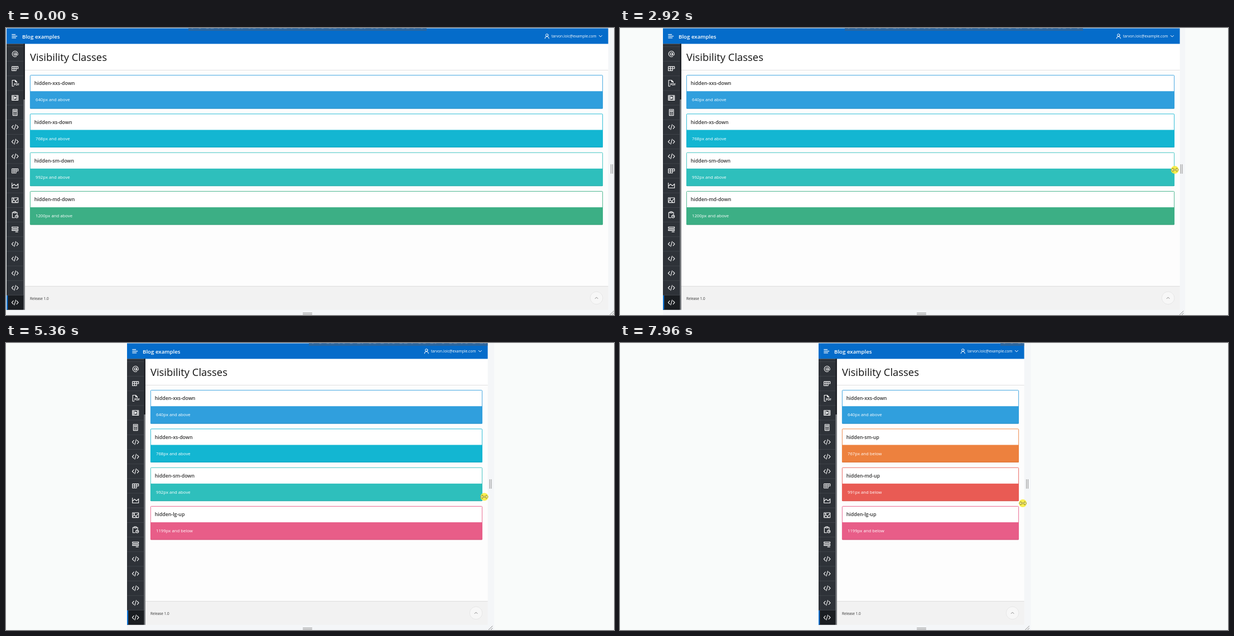
An HTML page for the animation above (8 s loop, 1090 px wide and 514 px high).

```html
<!DOCTYPE html>
<html lang="en">
<head>
<meta charset="utf-8">
<title>Visibility Classes</title>
<style>
html, body { margin: 0; width: 100%; height: 100%; overflow: hidden; background: #f9fbfa; }
svg { display: block; width: 1090px; height: 514px; font-family: "Open Sans", "Noto Sans", sans-serif; }
.line { fill: none; stroke-linecap: round; stroke-linejoin: round; }
</style>
</head>
<body>
<svg id="stage" viewBox="0 0 1090 514"></svg>
<script>
const stage = document.getElementById('stage');
const LOOP = 8000, SCALE = 0.5454, PITCH = 26.18;

// time, page left, handle offset, cursor offset (both from page right), cursor y
const KEYS = [
  [0, 1, 6.5, 4, 240],
  [1040, 2, 6.5, 4, 243],
  [1280, 6, 6.5, 0, 244],
  [2240, 49, 5, -6, 250],
  [2920, 77, 3, -9, 254],
  [3520, 120, 2, -7, 259],
  [4120, 149, 3.5, -5, 263],
  [4720, 195, 5, -5, 270],
  [5360, 217, 5, -6, 275.5],
  [5960, 251, 4, -5, 277.5],
  [7160, 306, 2, -4.5, 280.5],
  [7960, 356, 5.5, -2.5, 287]
];

// The screen refreshes every 200 ms, apart from a few uneven steps
const GAPS = { 4: 160, 5: 160, 6: 240, 11: 160, 12: 240, 13: 240, 18: 240, 19: 160, 25: 240 };
const ticks = [0, 120];
for (let k = 1; k < 40; k++) ticks.push(ticks[k] + (GAPS[k] || 200));

// Each card: its wide look, then its look below the breakpoint
const CARDS = [
  { min: 0, wide: ['hidden-xxs-down', '640px and above', '#309fdd'] },
  { min: 768, wide: ['hidden-xs-down', '768px and above', '#13b6d2'], slim: ['hidden-sm-up', '767px and below', '#ed813e'] },
  { min: 992, wide: ['hidden-sm-down', '992px and above', '#2ebfbc'], slim: ['hidden-md-up', '991px and below', '#e95b54'] },
  { min: 1200, wide: ['hidden-md-down', '1200px and above', '#3caf85'], slim: ['hidden-lg-up', '1199px and below', '#e85d88'] }
];

const ICONS = {
  at: '<circle r="2"/><path d="M2-2V.8a1.5 1.5 0 0 0 3 0V0A5 5 0 1 0 2.5 4.3"/>',
  grid: '<path d="M-5.5-3.6H5.5V.1H1.8V3.8H-5.5ZM-5.5 .1H1.8V-3.6M-1.8-3.6V3.8"/>',
  pdf: '<path d="M-2.3 5.4H-5V-5.4H.3L3.2-2.5V-.8M.3-5.4V-2.5H3.2"/><text x="-2.2" y="4.6" font-size="5.2" font-weight="700" fill="#fff" stroke="none">PDF</text>',
  film: '<path d="M-5.5-4.3H5.5V4.3H-5.5ZM-3.2-4.3V4.3M3.2-4.3V4.3M-5.5-1.4H-3.2M-5.5 1.4H-3.2M5.5-1.4H3.2M5.5 1.4H3.2"/><path d="M-1.2-2L1.8 0-1.2 2Z" fill="#fff"/>',
  calc: '<path d="M-3.8-5.4H3.8V5.4H-3.8ZM-2-3.4H2V-1.6H-2Z"/><path d="M-1.9 .9H2M-1.9 3.2H2" stroke-dasharray=".5 1.4"/>',
  code: '<path d="M-3-3L-5.8 0-3 3M3-3L5.8 0 3 3M1.3-4.5L-1.3 4.5"/>',
  chart: '<path d="M-5.5-4.5V4.4H5.5V-3L2 .6-1.8-2.4-5.5 1.6"/>',
  image: '<path d="M-5.5-4.3H5.5V4.3H-5.5ZM-5.3 2.8L-2.2-.4 .4 2 5.3-2.6M.4 2L2.5 4"/><circle cx="-2.6" cy="-2.3" r=".7"/>',
  clip: '<path d="M-.6 5.2H-4.8V-4.3H-2.4M1.4-4.3H3.8V-.6M-2.4-5.4H1.4V-3.2H-2.4Z"/><circle cx="3" cy="3" r="2.5"/><path d="M3 1.7V3H4"/>',
  rows: '<path d="M-5.4-4.4H5.4V-2H-5.4ZM-5.4 .1H5.4V2H-5.4ZM1 4.5H5" />'
};
const MENU = 'at grid pdf film calc code code code grid chart image clip rows code code code code code'.split(' ');

const rect = (x, y, w, h, fill, more = '') =>
  `<rect x="${x}" y="${y}" width="${w}" height="${h}" fill="${fill}" ${more}/>`;
const text = (x, y, size, fill, str, more = '') =>
  `<text x="${x}" y="${y}" font-size="${size}" fill="${fill}" ${more}>${str}</text>`;
const line = (d, stroke, w = 1, more = '') =>
  `<path class="line" d="${d}" stroke="${stroke}" stroke-width="${w}" ${more}/>`;

function sidebar() {
  let s = rect(0, 28.3, 33, 476.2, '#2e3238') + rect(30.2, 28.3, 2.8, 100, '#23262b');
  s += rect(30.5, 128, 2.3, 376.5, '#85888b');
  MENU.forEach((name, i) => {
    const y = 46.5 + i * PITCH;
    const top = y - PITCH / 2;
    if (i === MENU.length - 1) {
      s += rect(0, top, 30.3, PITCH, '#1a1d21') + rect(0, top, 2.2, PITCH, '#0a6fd0');
    }
    s += rect(0, top - 0.4, 30.3, 0.8, '#43474d');
    s += `<g class="line" stroke="#fff" stroke-width="1.1" transform="translate(15.2 ${y})">${ICONS[name]}</g>`;
  });
  return s;
}

function card(i) {
  const y = 84.2 + i * 69.3;
  return `<g id="card${i}">` +
    rect(42.4, y + 0.4, 0, 59.6, '#fff', 'class="box" rx="1.2"') +
    rect(42, y + 29, 0, 31.2, '#000', 'class="fill"') +
    rect(42.4, y + 59.4, 0, 0.8, '#000', 'class="foot" opacity=".12"') +
    text(49.7, y + 18, 8.8, '#333', '', 'class="name" font-weight="600"') +
    text(52, y + 47.1, 7.75, '#fff', '', 'class="range" font-weight="500"') + '</g>';
}

// Faint marks along the blurred bar over the header
let marks = '';
for (let i = 0; i < 38; i++) marks += `M${332 + i * 11 + (i * 7) % 5} .8h${2 + (i * 5) % 4}`;

stage.innerHTML =
  rect(0, 0, 1090, 514, '#f9fbfa') +
  rect(0, 0, 0, 514, '#f4f6f8', 'id="frame"') +
  `<g id="page">` +
    rect(0, 28, 0, 47.5, '#fff', 'class="full"') +
    rect(0, 75.5, 0, 387, '#fdfdfd', 'class="full"') +
    rect(0, 75, 0, 0.9, '#dedede', 'class="full"') +
    rect(0, 462, 0, 42.5, '#f2f2f2', 'class="full"') +
    rect(0, 462, 0, 0.9, '#dcdcdc', 'class="full"') +
    rect(0, 0.6, 0, 27.8, '#056cca', 'class="full"') +
    `<svg id="bar" x="326" y="0" width="427" height="6" viewBox="326 0 427 6" preserveAspectRatio="xMinYMin slice">` +
      rect(326, 0, 427, 5, '#3f6287', 'opacity=".65"') + line(marks, '#a9bdd2', 0.7, 'opacity=".6"') + '</svg>' +
    line('M9.7 11.6h6M9.7 14.6h9M9.7 17.6h7', '#fff', 1.1) +
    text(28, 18.5, 9.7, '#fff', 'Blog examples', 'font-weight="600"') +
    sidebar() +
    text(42, 59.2, 18.4, '#111', 'Visibility Classes') +
    CARDS.map((c, i) => card(i)).join('') +
    text(42, 486.5, 6.4, '#333', 'Release 1.0') +
  `</g><g id="right">` +
    `<g class="line" stroke="#fff" stroke-width="1"><circle cx="-109.8" cy="12.8" r="2.2"/>` +
    `<path d="M-113.4 18.8a3.6 3.6 0 0 1 7.2 0M-16.2 13.4l2.5 2.5 2.5-2.5"/></g>` +
    text(-101.7, 17.3, 6.7, '#fff', 'tarvon.loic@example.com', 'font-weight="500"') +
    `<circle cx="-21" cy="483.5" r="11.3" fill="#f7f7f7" stroke="#e2e2e2" stroke-width=".8"/>` +
    line('M-23.4 484.6l2.4-2.4 2.4 2.4', '#777', 0.9) +
  `</g>` +
  line('M532.5 510.4h16M532.5 513h16', '#8c8c8c', 1) +
  `<g id="handle">` + line('M-1.4 244.5v16M1.4 244.5v16', '#8c8c8c', 1) +
    line('M-3.5 513.6l7-6.6M.6 513.6l3-2.8', '#8c8c8c', 1) + `</g>` +
  `<g id="cursor"><circle r="7" fill="#f8ec3c" opacity=".9"/>` +
    `<path d="M-6.8 0L-3.2-3.2V-1H3.2V-3.2L6.8 0 3.2 3.2V1H-3.2V3.2Z" fill="#fbf59a" stroke="#827a1c" stroke-width=".8"/></g>`;

const el = id => document.getElementById(id);
const full = document.querySelectorAll('.full');
const move = (id, x, y = 0) => el(id).setAttribute('transform', `translate(${x} ${y})`);
const cards = CARDS.map((c, i) => {
  const part = name => el('card' + i).querySelector('.' + name);
  return { ...c, box: part('box'), fill: part('fill'), foot: part('foot'), name: part('name'), range: part('range') };
});

function pose(t) {
  let i = 0;
  while (i < KEYS.length - 2 && t >= KEYS[i + 1][0]) i++;
  const a = KEYS[i], b = KEYS[i + 1];
  const p = (t - a[0]) / (b[0] - a[0]);
  return a.map((v, j) => v + (b[j] - v) * p);
}

function drawCard(c, w) {
  const [name, range, color] = w >= c.min * SCALE ? c.wide : c.slim;
  c.box.setAttribute('width', w - 52.4);
  c.fill.setAttribute('width', w - 51.6);
  c.foot.setAttribute('width', w - 52.4);
  c.box.setAttribute('stroke', color);
  c.box.setAttribute('stroke-width', 0.9);
  c.fill.setAttribute('fill', color);
  c.name.textContent = name;
  c.range.textContent = range;
}

function draw(t) {
  const now = ticks.filter(s => s <= t).pop();
  const [, left, grip, dx, cy] = pose(now);
  const right = 1080.6 - left, w = right - left;
  move('page', left);
  move('right', right);
  move('handle', right + grip);
  move('cursor', right + dx, cy);
  el('cursor').setAttribute('visibility', now >= 320 ? 'visible' : 'hidden');
  el('frame').setAttribute('x', left);
  el('frame').setAttribute('width', w + grip + 6.5);
  full.forEach(r => r.setAttribute('width', w));
  const bar = Math.min(427, w - 326);
  el('bar').setAttribute('width', bar);
  el('bar').setAttribute('viewBox', `326 0 ${bar} 6`);
  cards.forEach(c => drawCard(c, w));
}

function loop() {
  draw(performance.now() % LOOP);
  requestAnimationFrame(loop);
}
loop();
</script>
</body>
</html>
```
